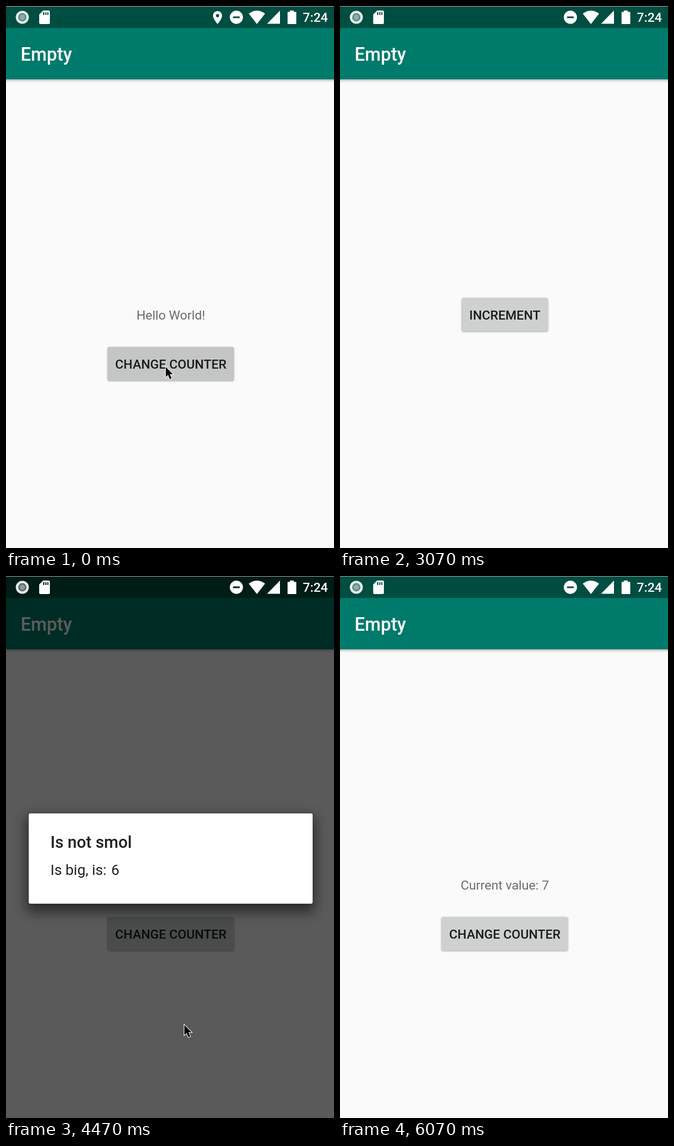
These frames come from a looping animation (583 px wide and 961 px high, 6.14 s). An HTML page:

```html
<!DOCTYPE html>
<html lang="en">
<head>
<meta charset="utf-8">
<title>Counter app</title>
<style>
  html, body { margin: 0; width: 100%; height: 100%; overflow: hidden; background: #fafafa; }
  svg { display: block; font: 22.67px Roboto, sans-serif; }
  .medium { font-weight: 500; }
  .mid { text-anchor: middle; }
  .title { font-size: 32.4px; fill: #fff; }
  .button { fill: #cfd1d0; filter: drop-shadow(0 1.5px 1.5px rgba(0, 0, 0, .35)); }
  .bar { fill: #007a6b; filter: drop-shadow(0 2px 2px rgba(0, 0, 0, .3)); }
  .label { fill: #1b1b1b; }
  .message { font-size: 25.9px; fill: #212121; }
</style>
</head>
<body>
<svg width="583" height="961" viewBox="0 0 583 961">
  <defs>
    <g id="screen">
      <rect width="583" height="961" fill="#fafafa"/>
      <rect class="bar" x="-10" width="603" height="130"/>
      <rect width="583" height="39" fill="#004d41"/>
      <text class="title medium" x="26" y="97">Empty</text>
    </g>
  </defs>

  <g id="home">
    <use href="#screen"/>
    <text id="value" class="mid" x="293" y="556" fill="#6c6c6c"></text>
    <rect id="change" class="button" x="180.5" y="604.5" width="224.5" height="59.5" rx="3"/>
    <text class="label medium mid" x="293" y="643">CHANGE COUNTER</text>
  </g>

  <g id="editor">
    <use href="#screen"/>
    <rect id="increment" class="button" x="216.5" y="517.5" width="153" height="59" rx="3"/>
    <text class="label medium mid" x="293" y="556">INCREMENT</text>
  </g>

  <rect id="dim" width="583" height="961"/>

  <g id="dialog">
    <rect id="shadow" x="36" y="426" width="513" height="170" rx="6" style="filter: blur(11px)"/>
    <rect x="40.5" y="421" width="504.5" height="160" rx="3" fill="#fff"/>
    <text class="medium" x="79" y="482" font-size="29.15" fill="#212121">Is not smol</text>
    <text class="message" x="79" y="530">Is big, is:</text>
    <text id="below" class="message" x="187" y="530"></text>
    <text id="above" class="message" x="187" y="530"></text>
  </g>

  <g id="status" fill="#fff">
    <circle cx="29" cy="20" r="9.4" fill="none" stroke="#e4ecea" stroke-width="4.4"/>
    <circle cx="29" cy="20" r="7.3" opacity=".3"/>
    <circle cx="29" cy="20" r="5" opacity=".35"/>
    <path fill-rule="evenodd" d="M66 8H76q2 0 2 2V30q0 2-2 2H61q-2 0-2-2V15zM66 11v5h2v-5zM69.700 11v5h2v-5zM73.400 11v5h2v-5z"/>
    <path id="pin" transform="translate(362.200 6.700) scale(1.150)" d="M12 2C8.130 2 5 5.130 5 9c0 5.250 7 13 7 13s7-7.750 7-13c0-3.870-3.130-7-7-7zm0 9.500a2.500 2.500 0 0 1 0-5a2.500 2.500 0 0 1 0 5z"/>
    <path fill-rule="evenodd" d="M397.800 20a11.700 11.700 0 0 1 23.400 0a11.700 11.700 0 0 1-23.400 0zM403.500 18.500v3h12v-3z"/>
    <path d="M446 32L431.500 13.500Q446 3 460.500 13.500zM464 31.500H487V8zM504.500 8h7v2.500h4.500V32h-15.500V10.500h4z"/>
    <text class="medium" x="527.500" y="28">7:24</text>
  </g>

  <path id="cursor" d="M0 0V17.800L4 14.300l3.200 7.400 3.200-1.400-3.100-7.200h5.400z" stroke="#fff" stroke-width="2" paint-order="stroke"/>
  <rect width="583" height="1" fill="#a3a3a3"/>
</svg>
<script>
const LOOP = 6140, STEP = 1000 / 15;
const $ = id => document.getElementById(id);
const ramp = (t, from, to) => Math.min(1, Math.max(0, (t - from) / (to - from)));
const easeOut = p => 1 - (1 - p) ** 2;
const easeInOut = p => p * p * (3 - 2 * p);
const fade = (id, alpha) => $(id).setAttribute('opacity', alpha);

// Pointer stops: time, x, y; null means hidden until the next stop
const path = [
  [0, 284, 640], [330, 284, 640], [670, 289, 563], [800, 291, 560], [2220, 291, 560],
  [2580, 264, 821], [2590, null], [4260, 311, 801], [4400, 317, 796],
  [5560, 317, 796], [5850, 306, 965], [5860, null], [LOOP, null]
];
const clicks = [1270, 1470, 1640, 1960];      // taps on the increment button
const dismissals = [4330, 4550, 4850, 5030];  // stacked dialogs closed one by one

function moveCursor(t) {
  const i = path.findIndex(stop => stop[0] > t);
  const [t0, x0, y0] = path[i - 1], [t1, x1, y1] = path[i];
  const shown = x0 !== null && x1 !== null;
  fade('cursor', shown ? 1 : 0);
  if (!shown) return;
  const p = easeInOut(ramp(t, t0, t1));
  $('cursor').setAttribute('transform', `translate(${x0 + (x1 - x0) * p} ${y0 + (y1 - y0) * p})`);
}

function press(id, amount) {
  const [r, g, b] = [207, 209, 208].map(c => c - 11 * amount);
  $(id).style.fill = `rgb(${r}, ${g}, ${b})`;
}

function draw(t) {
  // The second screen rises in, then drops away
  const enter = ramp(t, 130, 400), leave = ramp(t, 3270, 3530);
  fade('editor', ramp(t, 130, 330) * (1 - leave));
  $('editor').setAttribute('transform', `translate(0 ${77 * ((1 - easeOut(enter)) + leave ** 2)})`);
  $('value').textContent = t < 3000 ? 'Hello World!' : 'Current value: 7';
  fade('pin', t < 200 ? 1 : 0);

  press('change', 1 - ramp(t, 130, 400));
  press('increment', Math.max(...clicks.map(c => t < c - 5 ? 0 : 1 - ramp(t, c + 40, c + 140))));

  const dim = t < 5200 ? .64 * easeOut(ramp(t, 3330, 3830)) : .64 * (1 - ramp(t, 5200, 5465));
  fade('dim', dim);

  const count = 7 - dismissals.reduce((sum, d) => sum + ramp(t, d, d + 100), 0);
  const top = Math.ceil(count);
  $('above').textContent = top;
  $('below').textContent = top - 1;
  fade('above', 1 - (top - count));
  fade('below', top - count);
  fade('shadow', .4 + .04 * (count - 3));
  fade('dialog', t < 5200 ? ramp(t, 3390, 3600) : 1 - ramp(t, 5200, 5313));

  moveCursor(t);
}

const start = performance.now();
function tick() {
  const t = (performance.now() - start) % LOOP;
  draw(Math.floor((t + 4) / STEP) * STEP);
  requestAnimationFrame(tick);
}
tick();
</script>
</body>
</html>
```
